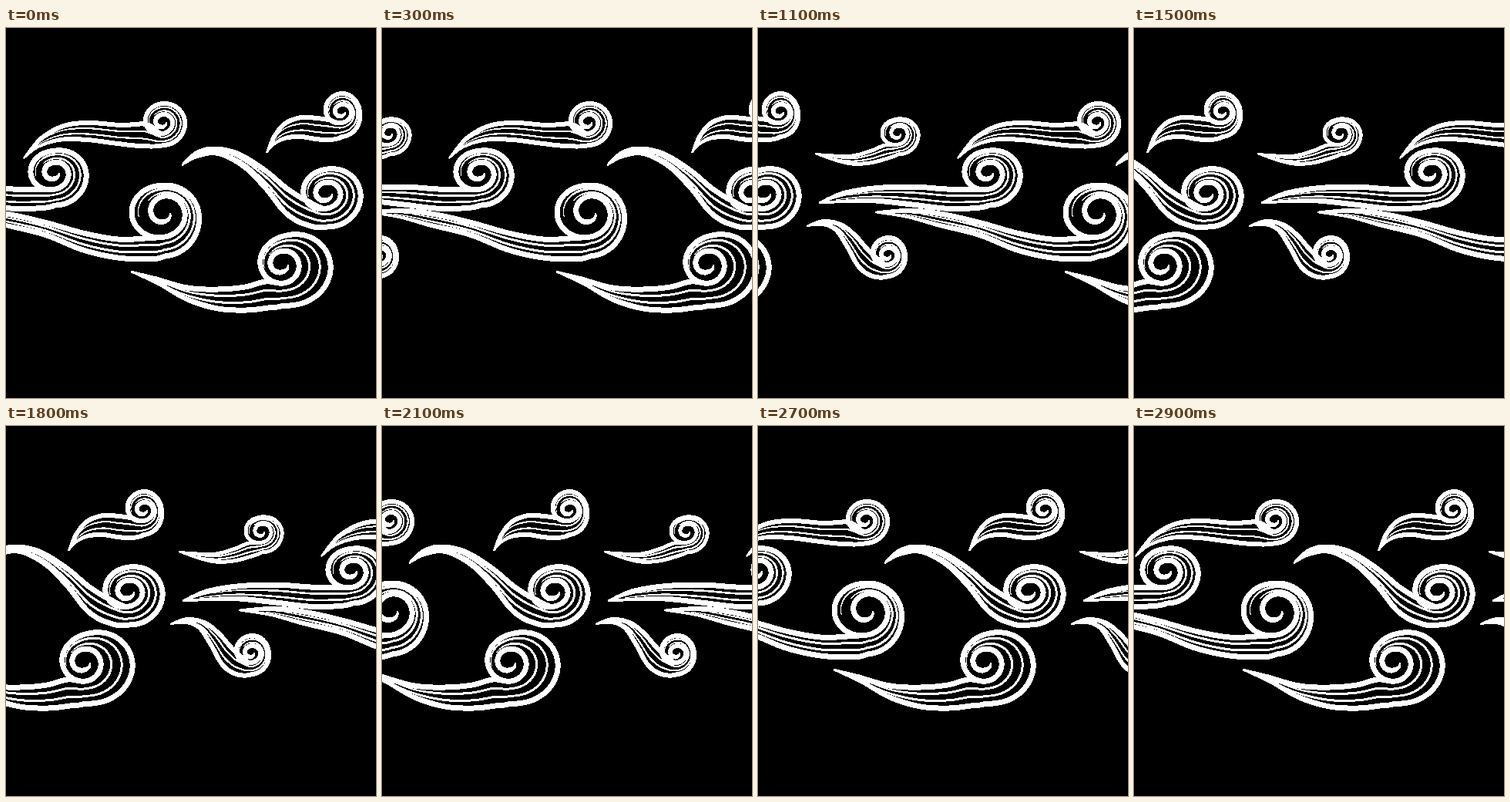
An HTML page that plays this animation: 480 px wide and 480 px high, repeating every 3.1 s.

```html
<!DOCTYPE html>
<html lang="en">
<head>
<meta charset="utf-8">
<title>Wind</title>
<style>
  html, body { margin: 0; width: 100%; height: 100%; overflow: hidden; background: #000; }
  svg { display: block; width: 100vw; height: 100vh; }
</style>
</head>
<body>
<svg viewBox="0 0 480 480" shape-rendering="crispEdges">
  <g id="wind" fill="#fff"></g>
</svg>
<script>
const SPAN = 643, STEPS = 30, STEP_MS = 100, LOOP_MS = 3100;
const wind = document.getElementById('wind');
const mix = (a, b, f) => a + (b - a) * f;

function cubic(a, b, c, d, t) {
  return b + 0.5 * t * (c - a + t * (2 * a - 5 * b + 4 * c - d + t * (3 * (b - c) + d - a)));
}

// Smooth value of a number list at fractional index u
function smooth(list, u) {
  const last = list.length - 1;
  const i = Math.max(0, Math.min(last - 1, Math.floor(u)));
  const at = j => list[Math.max(0, Math.min(last, j))];
  return cubic(at(i - 1), at(i), at(i + 1), at(i + 2), u - i);
}

// Closed outline around a centre line; width(u) for u in 0..1
function ribbon(points, width) {
  const left = [], right = [], last = points.length - 1;
  points.forEach(([x, y], i) => {
    const a = points[Math.max(0, i - 1)], b = points[Math.min(last, i + 1)];
    const dx = b[0] - a[0], dy = b[1] - a[1];
    const k = width(i / last) / 2 / (Math.hypot(dx, dy) || 1);
    left.push([x - dy * k, y + dx * k]);
    right.unshift([x + dy * k, y - dx * k]);
  });
  const text = left.concat(right).map(p => p.map(v => v.toFixed(1)).join(' ')).join('L');
  return 'M' + text + 'Z';
}

const parse = s => s.split(' ').map(p => p.split(',').map(Number));

// radii: distance from the eye at each quarter turn, from below the eye,
// then right, above, left and on inwards
function swirl({ dx = 0, line, thin, eye, radii, upper, lower }) {
  const polar = (q, r) => {
    const a = (1 - q) * Math.PI / 2;
    return [eye[0] + r * Math.cos(a), eye[1] + r * Math.sin(a)];
  };
  const coil = q => polar(q, smooth(radii, q));

  const edge = (text, q) => {
    const pts = [...parse(text), coil(q), coil(q + 0.6)];
    const xs = pts.map(p => p[0]), ys = pts.map(p => p[1]);
    const n = pts.length - 2;
    return u => [smooth(xs, u * n), smooth(ys, u * n)];
  };
  const top = edge(upper, 4), bottom = edge(lower, 0);

  const trace = (fn, from, to, count) =>
    Array.from({ length: count + 1 }, (_, i) => fn(mix(from, to, i / count)));

  const strand = (f, start, end) => {
    const body = u => {
      const a = bottom(u), b = top(u);
      return [mix(a[0], b[0], f), mix(a[1], b[1], f)];
    };
    const round = q => polar(q, mix(smooth(radii, q), smooth(radii, q + 4), f));
    const pts = trace(body, start, 1, 60).concat(trace(round, 0.04, end, 70));
    return ribbon(pts, u => thin * Math.min(1, 0.3 + u * 5, 0.3 + (1 - u) * 5));
  };

  const outer = trace(bottom, 0, 1, 60).concat(trace(coil, 0.04, radii.length - 1, 150));
  const d = [
    ribbon(outer, u => line * Math.min(1, 0.35 + u * 6, 0.3 + (1 - u) * 7)),
    ribbon(trace(top, 0, 1, 60), u => line * Math.min(1, 0.35 + u * 4, 0.5 + (1 - u) * 4)),
    strand(0.34, 0.12, 3.1),
    strand(0.67, 0.2, 2.6)
  ];
  const g = document.createElementNS(wind.namespaceURI, 'g');
  g.setAttribute('transform', `translate(${dx} 0)`);
  for (const shape of d) {
    const path = document.createElementNS(wind.namespaceURI, 'path');
    path.setAttribute('d', shape);
    g.append(path);
  }
  wind.append(g);
}

swirl({
  line: 6, thin: 2.2, eye: [204, 122],
  radii: [30, 28, 24, 23, 15, 12, 10, 10, 6, 4],
  upper: '23,169 46,143 75,127 108,123 150,126 182,125',
  lower: '23,169 42,154 70,145 105,145 145,150 175,153'
});
swirl({
  line: 6, thin: 2.2, eye: [436, 109],
  radii: [32, 23, 24, 21, 14, 12, 10, 9, 5, 4],
  upper: '338,162 348,141 362,124 383,116 403,117 418,119',
  lower: '338,162 347,151 362,143 382,141 402,144 420,145'
});
swirl({
  line: 7, thin: 3, eye: [417, 215],
  radii: [43, 43, 32, 31, 19, 17, 15, 15, 8, 6],
  upper: '228,178 245,164 268,157 300,163 335,184 364,208 390,224',
  lower: '228,178 248,167 275,163 308,179 338,209 363,240 389,255'
});
swirl({
  line: 7, thin: 3, eye: [360, 307],
  radii: [53, 61, 37, 30, 24, 20, 18, 17, 9, 6],
  upper: '162,316 195,326 235,337 275,339 310,336 337,329',
  lower: '162,316 198,332 235,352 275,364 312,366 340,363'
});
swirl({
  line: 7, thin: 3, eye: [206, 240],
  radii: [56, 44, 36, 43, 31, 26, 22, 18, 11, 7],
  upper: '-84,239 -40,237 0,241 50,252 100,266 145,274 180,273',
  lower: '-84,239 -42,245 0,256 50,268 100,288 145,298 180,299'
});
swirl({
  dx: -236, line: 7, thin: 2.6, eye: [300, 188],
  radii: [42, 40, 29, 32, 21, 17, 14, 14, 7, 5],
  upper: '79,227 110,215 150,208 200,206 245,209 275,209',
  lower: '79,227 110,225 150,224 200,229 242,234 275,234'
});
swirl({
  dx: -236, line: 5, thin: 2.2, eye: [182, 137],
  radii: [27, 26, 19, 21, 14, 12, 10, 9, 5, 3],
  upper: '74,163 98,166 122,166 145,160 165,152',
  lower: '74,163 98,171 122,176 145,175 165,170'
});
swirl({
  dx: -236, line: 6, thin: 2.2, eye: [169, 294],
  radii: [28, 22, 22, 20, 13, 11, 9, 9, 5, 3],
  upper: '63,257 85,251 107,255 125,268 140,285 152,297',
  lower: '63,257 83,255 101,262 116,284 131,310 149,322'
});

const trail = wind.cloneNode(true);
trail.id = 'trail';
wind.after(trail);

function draw(ms) {
  const step = Math.min(STEPS - 1, Math.floor((ms % LOOP_MS) / STEP_MS));
  const x = Math.round(step * SPAN / STEPS);
  wind.setAttribute('transform', `translate(${x} 0)`);
  trail.setAttribute('transform', `translate(${x - SPAN} 0)`);
}

const begin = performance.now();
function tick() {
  draw(performance.now() - begin);
  requestAnimationFrame(tick);
}
tick();
</script>
</body>
</html>
```
